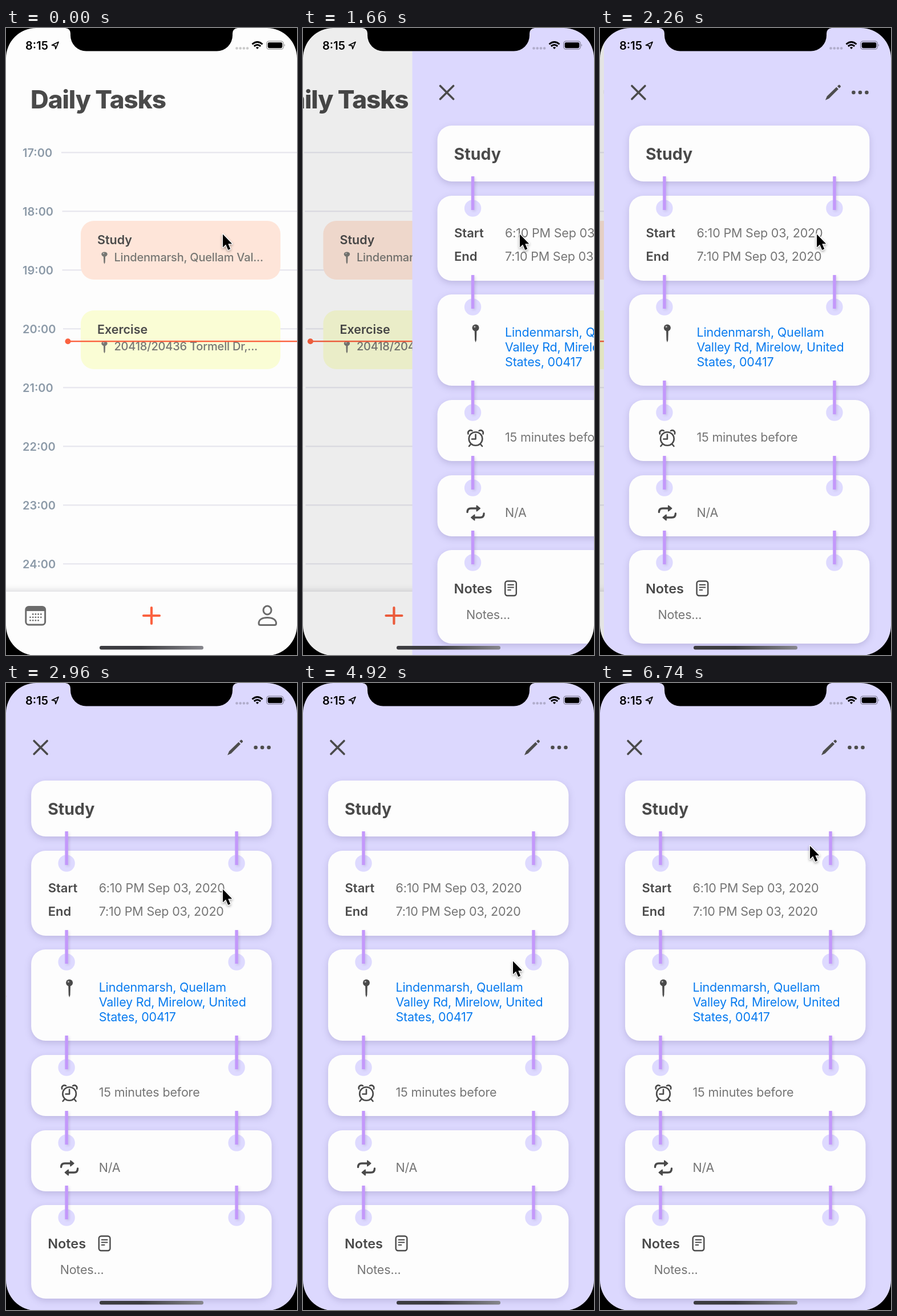
An HTML page for the animation above (6.76 s loop, 510 by 1099 pixels).

```html
<!DOCTYPE html>
<html lang="en">
<head>
<meta charset="utf-8">
<title>Daily Tasks</title>
<style>
  html, body { margin: 0; width: 100%; height: 100%; overflow: hidden; background: #000; }
  svg { display: block; width: 100%; height: 100%; }
  text { font-family: Inter, "Liberation Sans", sans-serif; fill: #4a4a4a; font-weight: 600; }
  .title { font-size: 44px; font-weight: 800; letter-spacing: -1.1px; }
  .clock { font-size: 20px; fill: #000; }
  .hour { font-size: 20px; fill: #8c9aa8; }
  .task { font-size: 21.5px; }
  .place { font-size: 20px; font-weight: 500; fill: #777773; letter-spacing: -.2px; }
  .head { font-size: 28.5px; font-weight: 700; }
  .label { font-size: 22px; }
  .notes { font-size: 23.5px; }
  .value { font-size: 21.5px; font-weight: 400; fill: #757575; letter-spacing: -.18px; }
  .link { fill: #087bef; }
  .ico { fill: none; stroke: #4a4a4a; stroke-linecap: round; stroke-linejoin: round; }
  .card { fill: #fdfdfd; filter: drop-shadow(0 4px 6px rgba(40, 30, 90, .17)); }
  .bar { fill: #fdfdfd; filter: drop-shadow(0 -2px 6px rgba(60, 60, 80, .2)); }
  .ring { fill: #dedaff; }
  .strap { fill: #c398fb; filter: drop-shadow(2px 2px 2px rgba(60, 30, 100, .15)); }
  #cursor { filter: drop-shadow(0 2px 2px rgba(0, 0, 0, .35)); }
</style>
</head>
<body>
<svg viewBox="0 0 510 1099">
  <defs>
    <g id="pin">
      <path d="M-1.9 4H1.9L1.4 21.5L0 25.5L-1.4 21.5Z"/>
      <circle r="6"/>
      <circle cx="-1.7" cy="-1.8" r="1.6" fill="#fff" fill-opacity=".55"/>
    </g>
    <linearGradient id="grip">
      <stop offset=".4" stop-color="#3c3c40"/>
      <stop offset="1" stop-color="#87878d"/>
    </linearGradient>
  </defs>

  <g id="home">
    <rect width="510" height="1099" fill="#fdfdfd"/>
    <text class="title" x="43" y="141">Daily Tasks</text>
    <g id="hours"></g>
    <rect x="131" y="338" width="350" height="103" rx="23" fill="#fee5d9"/>
    <text class="task" x="160" y="379">Study</text>
    <use href="#pin" transform="translate(172.500 396.500) scale(.87 .68)" fill="#777773"/>
    <text class="place" x="189.500" y="408.500">Lindenmarsh, Quellam Val...</text>
    <rect x="131" y="495" width="350" height="103" rx="23" fill="#fafdd5"/>
    <text class="task" x="160" y="535.500">Exercise</text>
    <use href="#pin" transform="translate(172.500 553) scale(.87 .68)" fill="#777773"/>
    <text class="place" x="189.500" y="565">20418/20436 Tormell Dr,...</text>
    <rect x="108" y="548" width="402" height="2.400" fill="#fb6240"/>
    <circle cx="108.500" cy="549.200" r="5" fill="#fb6240"/>

    <rect class="bar" x="-10" y="988" width="530" height="125"/>
    <g fill="#6c6c6c">
      <rect class="ico" x="34.800" y="1014.500" width="33.800" height="31.500" rx="5" style="stroke:#6c6c6c;stroke-width:3"/>
      <path d="M34 1022V1019Q34 1014 39 1014H64.500Q69.500 1014 69.500 1019V1022Z"/>
      <g id="days"></g>
    </g>
    <path class="ico" d="M241 1030H269M255 1016V1044" style="stroke:#fb6240;stroke-width:4.200"/>
    <g class="ico" style="stroke:#6c6c6c;stroke-width:3">
      <ellipse cx="458" cy="1020.500" rx="7" ry="7.500"/>
      <path d="M446 1046.500Q443 1046.500 443 1043.500C443 1037 449 1033.500 458 1033.500S473.500 1037 473.500 1043.500Q473.500 1046.500 470.500 1046.500Z"/>
    </g>
    <rect id="dim" width="510" height="1099" opacity="0"/>
  </g>

  <g id="detail" transform="translate(510)">
    <rect width="511" height="1099" fill="#dcd8fe"/>
    <path class="ico" d="M49 101.500L72 124.500M72 101.500L49 124.500" stroke-width="3.600"/>
    <g fill="#4d4d4d">
      <path d="M388 126.500L391 119.500L407.500 103.500L411 107L394.500 123.500Z"/>
      <path d="M409 102L411.500 99.800Q412.500 99.200 413.500 100.200L414.500 101.200Q415.500 102.200 414.700 103.200L412.500 105.500Z"/>
      <circle cx="437.500" cy="113" r="3.300"/>
      <circle cx="449" cy="113" r="3.300"/>
      <circle cx="460.500" cy="113" r="3.300"/>
    </g>
    <g id="cards"></g>
    <text class="head" x="73" y="231">Study</text>
    <text class="label" x="73.500" y="367">Start</text>
    <text class="label" x="73.500" y="408">End</text>
    <text class="value" x="162.500" y="367">6:10 PM Sep 03, 2020</text>
    <text class="value" x="162.500" y="408">7:10 PM Sep 03, 2020</text>
    <use href="#pin" x="111" y="525.500" fill="#4a4a4a"/>
    <text class="value link" x="162.500" y="540.500">Lindenmarsh, Quellam</text>
    <text class="value link" x="162.500" y="566.500">Valley Rd, Mirelow, United</text>
    <text class="value link" x="162.500" y="592.500">States, 00417</text>

    <g class="ico" stroke-width="2.600">
      <circle cx="111" cy="720" r="11.800"/>
      <path d="M111 712.500V720.500H104.500M102.500 729.500L99.500 733M119.500 729.500L122.500 733"/>
      <path d="M98 711.500C96.500 707 101 703.500 105 706M124 711.500C125.500 707 121 703.500 117 706"/>
    </g>
    <text class="value" x="162.500" y="724.500">15 minutes before</text>

    <g class="ico" stroke-width="3.400">
      <path d="M96.500 848.500C96.500 844 99 842 103 842H113M125.500 851C125.500 856 123 858 119 858H109"/>
      <path d="M113 837.500V846.500L118.500 842ZM109 853.500V862.500L103.500 858Z" fill="#4a4a4a" stroke-width="2"/>
    </g>
    <text class="value" x="162.500" y="856.500">N/A</text>

    <text class="notes" x="73" y="990.500">Notes</text>
    <g class="ico" stroke-width="2.400">
      <rect x="162.700" y="969.500" width="19.600" height="25.500" rx="4"/>
      <path d="M167.500 976H177.500M167.500 980.500H177.500M167.500 985H172.500" stroke-width="1.800"/>
    </g>
    <text class="value" x="94.500" y="1035.500">Notes...</text>
  </g>

  <text class="clock" x="34" y="37.500">8:15</text>
  <path d="M92 24.500L80.500 30L86 31L87 36.500Z" fill="none" stroke="#000" stroke-width="1.800" stroke-linejoin="round"/>
  <g fill="#000" fill-opacity=".2">
    <circle cx="404.500" cy="35.500" r="2.300"/>
    <circle cx="410.700" cy="35.500" r="2.300"/>
    <circle cx="416.900" cy="35.500" r="2.300"/>
    <circle cx="423.100" cy="35.500" r="2.300"/>
  </g>
  <g fill="none" stroke="#000" stroke-width="3">
    <path d="M431.500 28.500Q440.500 20.500 449.500 28.500M434.800 32Q440.500 27 446.200 32"/>
    <path d="M437.800 34.300Q440.500 32 443.200 34.300L440.500 37Z" fill="#000" stroke="none"/>
  </g>
  <rect x="456.700" y="23.200" width="29.600" height="14" rx="4.200" fill="none" stroke="#000" stroke-opacity=".4" stroke-width="1.300"/>
  <rect x="458.700" y="25.200" width="25.600" height="10" rx="2.400"/>
  <path d="M487.800 28Q490 30.200 487.800 32.500Z" fill-opacity=".45"/>
  <rect x="164" y="1083" width="182" height="6.500" rx="3.250" fill="url(#grip)"/>

  <path fill-rule="evenodd" d="M0 0H510V1099H0ZM53 0A53 53 0 0 0 0 53V1047A53 53 0 0 0 53 1100H457A53 53 0 0 0 510 1047V53A53 53 0 0 0 457 0Z"/>
  <path d="M104 0Q113 1 113 10V13A27.500 27.500 0 0 0 140.500 40.500H369.500A27.500 27.500 0 0 0 397 13V10Q397 1 406 0Z"/>

  <g id="cursor">
    <path d="M0 .5V23.500L5.200 18.600L9.200 28L13.200 26.300L9.300 17.200H16.200Z" stroke="#fff" stroke-width="2.600" stroke-linejoin="round" paint-order="stroke"/>
  </g>
</svg>

<script>
const $ = id => document.getElementById(id);

let hours = '';
for (let h = 17; h <= 24; h++) {
  const y = 218 + (h - 17) * 103;
  const x = h < 18 ? 97 : h < 20 ? 98.5 : 100;
  hours += `<text class="hour" x="29" y="${y + 7.5}">${h}:00</text>` +
    `<rect x="${x}" y="${y - 0.8}" width="${510 - x}" height="2.2" fill="#e7e6ee"/>`;
}
$('hours').innerHTML = hours;

let days = '';
for (let row = 0; row < 3; row++) {
  for (let col = 0; col < 5; col++) {
    if ((row === 0 && col < 1) || (row === 2 && col > 3)) continue;
    days += `<circle cx="${42.5 + col * 4.7}" cy="${1027.5 + row * 5.4}" r="1.4"/>`;
  }
}
$('days').innerHTML = days;

// Top and bottom of each sheet, bound to the one above by two straps
const sheets = [[171, 269], [294, 443], [467, 627], [652, 759], [784, 891], [915, 1079]];
let cards = '', straps = '';
sheets.forEach(([top, end], i) => {
  cards += `<rect class="card" x="44" y="${top}" width="421.500" height="${end - top}" rx="25"/>`;
  if (!i) return;
  for (const x of [106, 404]) {
    const y = top + 22;
    straps += `<circle class="ring" cx="${x}" cy="${y}" r="14.700"/>` +
      `<rect class="strap" x="${x - 2.7}" y="${y - 56}" width="5.400" height="59"/>`;
  }
});
$('cards').innerHTML = cards + straps;

const LOOP = 6760;

// Ticks come in threes, lasting 100, 20 and 20 ms
function tickAt(t) {
  if (t < 20) return 0;
  const u = t - 20, r = u % 140;
  return 1 + 3 * Math.floor(u / 140) + (r < 100 ? 0 : r < 120 ? 1 : 2);
}

function ease(n, from, to) {
  const p = Math.min(1, Math.max(0, (n - from) / (to - from)));
  return p * p * (3 - 2 * p);
}

function draw(now) {
  const n = tickAt(now % LOOP);
  // Critically damped push
  const s = Math.max(0, n - 27.9) * 0.298;
  const left = (1 + s) * Math.exp(-s);
  $('detail').setAttribute('transform', `translate(${(510 * left).toFixed(2)})`);
  $('home').setAttribute('transform', `translate(${(-153 * (1 - left)).toFixed(2)})`);
  $('dim').setAttribute('opacity', (0.1 * (1 - left)).toFixed(4));

  const down = ease(n, 70, 105), up = ease(n, 108, 144);
  $('cursor').setAttribute('transform', `translate(${380 - 12 * down} ${361 + 126 * down - 202 * up})`);
  requestAnimationFrame(draw);
}
draw(performance.now());
</script>
</body>
</html>
```
